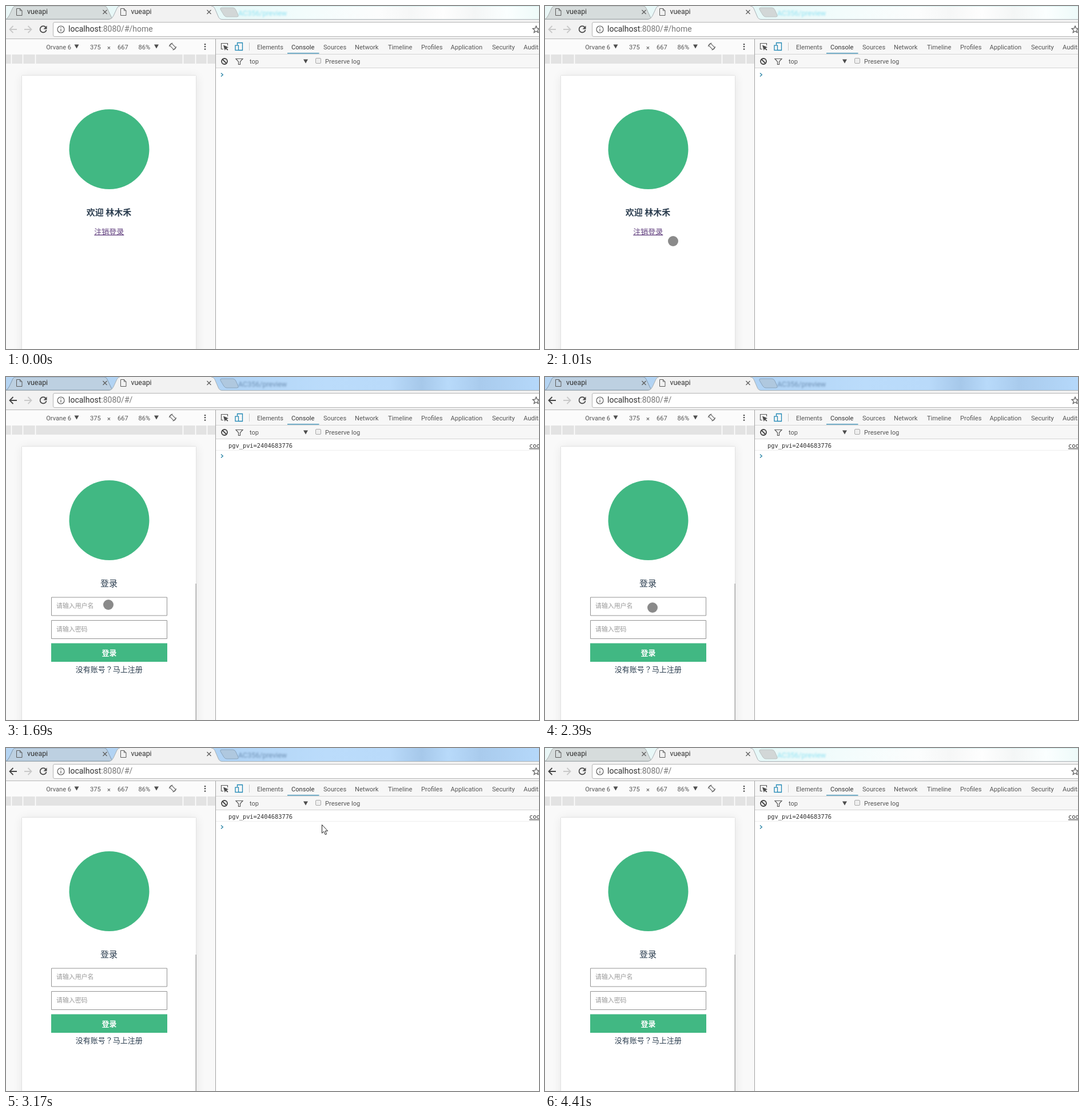
An HTML page that plays this animation: 932 px wide and 601 px high, repeating every 4490 ms.

```html
<!DOCTYPE html>
<html lang="zh">
<head>
<meta charset="utf-8">
<title>vueapi</title>
<style>
  html, body { margin: 0; width: 100%; height: 100%; overflow: hidden; background: #fff; }
  svg { display: block; width: 932px; height: 601px; }
  text { font: 11.1px Roboto, sans-serif; fill: #555; white-space: pre; }
  .tab { font-size: 12.4px; fill: #333; }
  .url { font-size: 14px; fill: #777; }
  .page text { font-family: "Noto Sans CJK SC", "Noto Sans CJK", sans-serif; font-size: 13px; fill: #2c3e50; text-anchor: middle; }
  .page .title { font-size: 15px; font-weight: 500; }
  .page .bold { font-weight: 700; }
  .page .link { fill: #62407f; text-decoration: underline 1px; }
  .page .hint { font-size: 10.9px; fill: #999; text-anchor: start; }
  .page .button { font-weight: 700; fill: #fff; }
  .centred { font-family: "Noto Sans CJK TC", "Noto Sans CJK", sans-serif; }
  .log text { font: 10.35px "DejaVu Sans Mono", monospace; fill: #303030; }
  .line { fill: none; stroke: #5a5a5a; stroke-width: 1.2; }
  .thin { stroke-width: 1; }
  .thick { stroke: #444; stroke-width: 1.8; }
  .nav { fill: none; stroke-width: 1.8; }
  .blur { filter: blur(1.8px); font-size: 12.5px; }
</style>
</head>
<body>
<svg viewBox="0 0 932 601">
  <defs>
    <linearGradient id="pale">
      <stop offset="0" stop-color="#eaf7f7"/><stop offset=".4" stop-color="#e6f8f8"/>
      <stop offset=".55" stop-color="#f2fcfc"/><stop offset=".7" stop-color="#fcfdfd"/>
      <stop offset=".76" stop-color="#f6f7f7"/><stop offset=".82" stop-color="#fefefe"/>
      <stop offset=".88" stop-color="#f4f6f6"/><stop offset=".94" stop-color="#fbffff"/>
      <stop offset="1" stop-color="#eefaf9"/>
    </linearGradient>
    <linearGradient id="blue">
      <stop offset="0" stop-color="#b5d4f2"/><stop offset=".4" stop-color="#b0d3f5"/>
      <stop offset=".6" stop-color="#bbdcfb"/><stop offset=".72" stop-color="#b9dafa"/>
      <stop offset=".78" stop-color="#a6c8ea"/><stop offset=".83" stop-color="#b8dafa"/>
      <stop offset=".89" stop-color="#a9cbed"/><stop offset="1" stop-color="#b5d8fa"/>
    </linearGradient>
    <filter id="shadow" x="-20%" y="-10%" width="140%" height="120%">
      <feGaussianBlur stdDeviation="9"/>
    </filter>
    <path id="file" class="line thin" d="M.5 .5H6.5L10 4V12.5H.5ZM6.5 .5V4H10"/>
    <path id="close" class="line" d="M-3.5-3.5 3.5 3.5M3.5-3.5-3.5 3.5"/>
    <path id="drop" d="M-4-3.5H4L0 3.5Z" fill="#4d4d4d"/>
    <path id="prompt" d="M-2-3 1.3 0-2 3" fill="none" stroke="#2f87a8" stroke-width="1.4"/>
    <path id="rearTab" d="M0 23Q3 22 6 16L12 3Q14 0 17 0H172Q175 0 177 4L184 19Q186 23 190 23Z"/>
    <path id="newTab" d="M377 3H397Q400 3 402 7L406 16Q407 19 404 19H386Q383 19 381 16L375 6Q374 3 377 3Z"/>
  </defs>

  <!-- Window strip -->
  <g id="idleStrip">
    <rect width="932" height="24" fill="url(#pale)"/>
    <rect x="378" width="554" height="1" fill="#d3efee"/>
    <text class="blur" x="406" y="17" style="fill:#8fe2f3">AC356/preview</text>
    <use href="#rearTab" fill="#d6dcdc" stroke="#a7adad"/>
    <use href="#newTab" fill="#d2d7d7" stroke="#bcc4c4"/>
  </g>
  <g id="focusStrip">
    <rect width="932" height="24" fill="url(#blue)"/>
    <text class="blur" x="406" y="17" style="fill:#6f91b5">AC356/preview</text>
    <use href="#rearTab" fill="#bdd0e1" stroke="#8198ae"/>
    <use href="#newTab" fill="#afc8df" stroke="#8ba6bf"/>
  </g>
  <path d="M0 23.5H182Q186 22 188 17L194 4Q196 0 199 0H359Q363 0 365 4L371 18Q373 23.5 378 23.5H932V58H0Z" fill="#f2f2f2"/>
  <path d="M0 23.5H180Q186 22 188 17L194 4Q196 0 199 0M359 0Q363 0 365 4L371 18Q373 23.5 378 23.5H932" fill="none" stroke="#a9b1b5"/>
  <use href="#file" x="18" y="4"/><use href="#file" x="200" y="4"/>
  <text class="tab" x="37" y="14.3">vueapi</text>
  <text class="tab" x="218.5" y="14.3">vueapi</text>
  <use href="#close" x="173" y="10.5"/><use href="#close" x="355" y="10.5"/>

  <!-- Address bar -->
  <path id="back" class="nav" d="M19 41H7M12.5 35 6.5 41 12.5 47"/>
  <path class="nav" stroke="#c9c9c9" d="M32 41H44M38.5 35 44.5 41 38.5 47"/>
  <path class="nav" stroke="#4a4a4a" d="M69.5 37.2A5.6 5.6 0 1 0 70.6 42"/>
  <path d="M71.5 34.5V40.5H65.5Z" fill="#4a4a4a"/>
  <path d="M940 28.5H85Q82.5 28.5 82.5 31V51Q82.5 53.5 85 53.5H940Z" fill="#fff" stroke="#b5b5b5"/>
  <circle class="line" cx="96" cy="41" r="6"/>
  <path class="line" d="M96 40V44.5M96 37V38.6"/>
  <text class="url" x="109" y="45"><tspan fill="#333">localhost</tspan>:8080/#/<tspan id="route">home</tspan></text>
  <path class="line" d="M927 35 928.7 39.1 933 39.4 929.7 42.2 930.8 46.5 927 44.2 923.2 46.5 924.3 42.2 921 39.4 925.3 39.1Z"/>

  <!-- Device preview -->
  <rect y="57" width="366" height="28" fill="#fbfbfb"/>
  <rect x="366" y="57" width="566" height="52" fill="#f7f7f7"/>
  <rect y="57" width="932" height="1" fill="#b8b8b8"/>
  <rect y="85" width="366" height="16" fill="#e3e3e3"/>
  <path d="M9.5 85V101M29.5 85V101M51.5 85V101M309.5 85V101M331.5 85V101M351.5 85V101" stroke="#fff" stroke-width="1.5"/>
  <text x="114" y="75.5" text-anchor="end">Orvane 6</text>
  <use href="#drop" x="123.5" y="71"/>
  <text x="147" y="75.5">375</text><text x="177" y="76.5">×</text>
  <text x="195" y="75.5">667</text><text x="231.5" y="75.5">86%</text>
  <use href="#drop" x="263" y="71"/>
  <g class="line thin">
    <rect x="-2.5" y="-5" width="5" height="10" rx="1" transform="translate(291.5 71) rotate(-45)"/>
    <path d="M285.5 71A6 6 0 0 1 291.5 65M297.5 71A6 6 0 0 1 291.5 77"/>
  </g>
  <path d="M346.8 66h2.5v2.3h-2.5zM346.8 70h2.5v2.3h-2.5zM346.8 74.5h2.5v2.3h-2.5z" fill="#505050"/>
  <rect y="101" width="366" height="500" fill="#f9f9f9"/>
  <rect x="28" y="123" width="305" height="520" opacity=".08" filter="url(#shadow)"/>
  <rect x="27.5" y="121.5" width="305" height="520" rx="1" fill="#fff" stroke="#e2e2e2"/>
  <g class="page">
    <circle cx="180.5" cy="251" r="70" fill="#41b883"/>
    <g id="home">
      <text class="title bold" x="180" y="367.3">欢迎 林木禾</text>
      <text class="link" x="180.3" y="399.7">注销登录</text>
    </g>
    <g id="login">
      <text class="title" x="180" y="367.3">登录</text>
      <path d="M79.5 386H281.5V418H79.5ZM79.5 426.5H281.5V458.5H79.5Z" fill="#fff" stroke="#929292"/>
      <text class="hint" x="88" y="405.3">请输入用户名</text>
      <text class="hint" x="88" y="445.8">请输入密码</text>
      <rect x="79" y="466.5" width="203" height="32.5" fill="#41b883"/>
      <text class="button" x="180.5" y="487.8">登录</text>
      <text x="180.3" y="517.2">没有账号<tspan class="centred" lang="zh-Hant">？</tspan>马上注册</text>
      <rect x="331.5" y="362" width="1.5" height="239" fill="#a8a8a8"/>
    </g>
  </g>

  <!-- Developer tools -->
  <rect x="367" y="109" width="565" height="492" fill="#fff"/>
  <path d="M367 84.5H932M367 108.5H932" stroke="#d4d4d4"/>
  <rect x="366" y="58" width="1" height="543" fill="#a3a3a3"/>
  <path class="line" d="M380 75.5H376.5V65.5H387.5V69"/>
  <path d="M380 68.5 389 72.3 385.7 73.7 388.5 76.6 387.2 77.8 384.3 75 382.7 78Z" fill="#4a4a4a"/>
  <g fill="none" stroke="#1f87b5" stroke-width="1.3">
    <path d="M404.5 68V64.5H413.5V77.5H407"/><rect x="401" y="69" width="5.5" height="8.5"/>
  </g>
  <path d="M425.5 64V78" stroke="#ccc"/>
  <g id="panels"></g>
  <rect x="492" y="82" width="55.5" height="1.5" fill="#4a96b8"/>
  <path class="line thick" d="M387 97A5 5 0 1 1 377 97A5 5 0 1 1 387 97M378.5 93.5 385.5 100.5"/>
  <path class="line" d="M402 92.5H414L409.5 97.5V102.5H406.5V97.5Z"/>
  <text x="426" y="101">top</text>
  <use href="#drop" x="524" y="97"/>
  <rect x="541.5" y="91.5" width="9" height="9" rx="1.5" fill="#eee" stroke="#aaa"/>
  <text x="558" y="101">Preserve log</text>
  <g id="log" class="log">
    <text x="389" y="124.3">pgv_pvi=2404683776</text>
    <text x="915" y="124.3" text-decoration="underline">cookie</text>
    <path d="M367 128.5H932" stroke="#eee"/>
  </g>
  <use id="caret" href="#prompt" x="378"/>

  <circle id="touch" r="9" fill="#3c3c3c" fill-opacity=".6"/>
  <path id="arrow" d="M.5 .5V15.2L3.8 12.2 6.3 17.8 8.6 16.8 6.2 11.3H10.6Z" fill="#fff" stroke="#222"/>
</svg>
<script>
  const LOOP = 4490, FOCUS = 1540, LOGOUT = 1690, BLUR = 4410;
  const PAGE_RIGHT = 333;
  const el = id => document.getElementById(id);
  const show = (id, on) => el(id).setAttribute("visibility", on ? "visible" : "hidden");

  const panels = { Elements: 439, Console: 499, Sources: 555, Network: 610, Timeline: 668,
    Profiles: 726, Application: 777.5, Security: 850, Audits: 905 };
  el("panels").innerHTML = Object.entries(panels).map(([name, x]) =>
    `<text x="${x}" y="75.5"${name === "Console" ? ' style="fill:#333"' : ""}>${name}</text>`).join("");

  // Each run: first time, last time, then the pointer's x,y at even steps.
  const runs = [
    [150, 670, "822,584 738,535 645,487 552,447 466,416 392,397 333,406 288,418"],
    [750, 1220, "273,417 257,416 240,414 224,412 209,409 197,407 187,405"],
    [1310, 1370, "183,402 179,399"],
    [2390, 2850, "188,404 213,412 256,417 315,408 383,379 425,314 452,241"],
    [2950, 3410, "470,165 504,111 552,134 602,194 643,270 672,350 695,421"],
    [3480, 3630, "752,486 839,569 -99,-99"]
  ];
  const steps = runs.flatMap(([from, to, path]) => {
    const points = path.split(" ");
    return points.map((p, i) => {
      const [x, y] = p.split(",").map(Number);
      const time = from + (to - from) * i / (points.length - 1);
      return { time: Math.floor(time / 10) * 10, x, y };
    });
  });

  function draw(t) {
    const focused = t >= FOCUS && t < BLUR;
    const loggedOut = t >= LOGOUT;
    show("focusStrip", focused);
    show("idleStrip", !focused);
    show("home", !loggedOut);
    show("login", loggedOut);
    show("log", loggedOut);
    el("route").textContent = loggedOut ? "" : "home";
    el("back").setAttribute("stroke", loggedOut ? "#444" : "#c9c9c9");
    el("caret").setAttribute("y", loggedOut ? 138.5 : 120.5);

    const at = steps.findLast(s => s.time <= t);
    const inside = at && at.x < PAGE_RIGHT;
    show("touch", inside);
    show("arrow", at && !inside);
    if (at) for (const id of ["touch", "arrow"])
      el(id).setAttribute("transform", `translate(${at.x} ${at.y})`);
  }

  const start = performance.now();
  function tick() {
    draw((performance.now() - start) % LOOP);
    requestAnimationFrame(tick);
  }
  tick();
</script>
</body>
</html>
```
